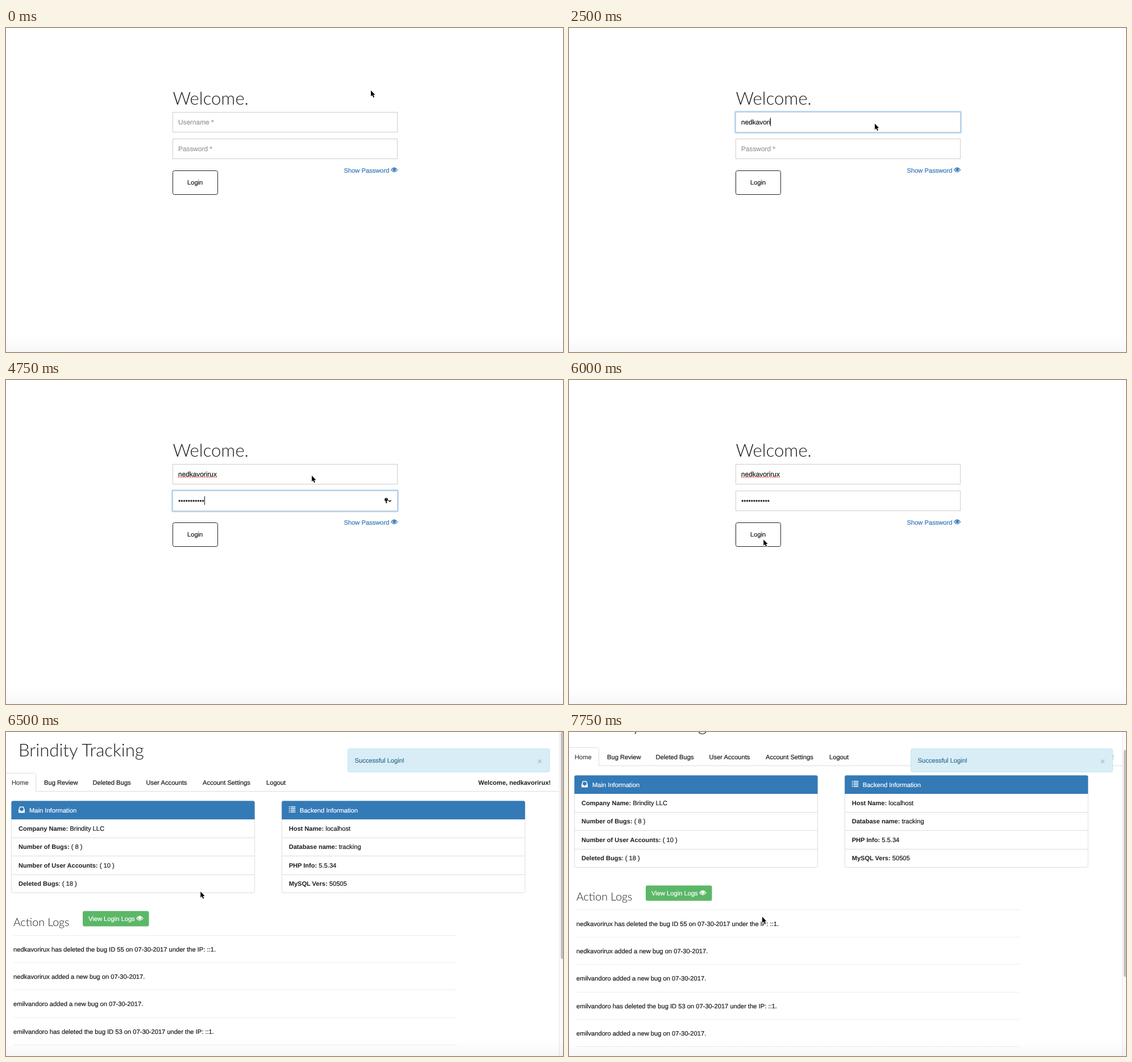
Animation, 980 px wide and 571 px high, one loop 8 s. Source, as an HTML page:

```html
<!DOCTYPE html>
<html lang="en">
<head>
<meta charset="utf-8">
<title>Login demo</title>
<style>
  html, body { margin: 0; width: 100%; height: 100%; overflow: hidden; background: #fff; }
  svg { display: block; width: 980px; height: 571px; }
  text {
    font: 11.17px "Liberation Sans", Arial, sans-serif; color: #1c1c1c;
    fill: currentColor; stroke: currentColor; stroke-width: .22;
    text-rendering: geometricPrecision; white-space: pre;
  }
  .title { font: 300 31.1px Lato, sans-serif; stroke: none; }
  .sub { font: 300 19.6px Lato, sans-serif; stroke: none; }
  .field { font-size: 11.85px; }
  .hint { color: #999; }
  .bold { font-weight: bold; font-size: 11.05px; stroke: none; }
  .white { color: #fff; }
  .link { color: #337ab7; }
  .tab { color: #444; }
  .info { color: #31708f; }
  .box { fill: none; stroke: #ccc; }
  .ring { fill: none; stroke: #b7d9f6; stroke-width: 3; }
  .line { stroke: #ddd; }
  .rule { stroke: #eee; }
</style>
</head>
<body>
<svg viewBox="0 0 980 571" xmlns="http://www.w3.org/2000/svg">
  <defs>
    <linearGradient id="fade" x1="0" y1="0" x2="0" y2="1">
      <stop offset="0" stop-color="#000" stop-opacity="0"/>
      <stop offset="1" stop-color="#000" stop-opacity=".032"/>
    </linearGradient>
    <g id="eye">
      <path d="M.5 5Q6 -2.2 11.5 5Q6 12.2 .5 5Z" fill="none" stroke="currentColor" stroke-width="1.2"/>
      <circle cx="6" cy="4.5" r="2.8" fill="currentColor"/>
      <path d="M4.6 4.2Q4.7 3 5.9 2.8" fill="none" stroke="#fff" stroke-width=".7"/>
    </g>
  </defs>

  <g id="login">
    <text class="title" x="293.5" y="135">Welcome.</text>
    <rect class="ring" id="userRing" x="292.5" y="147.5" width="397" height="37" rx="1.5"/>
    <rect class="ring" id="passRing" x="292.5" y="194.5" width="397" height="37" rx="1.5"/>
    <rect class="box" x="293.5" y="148.5" width="395" height="35"/>
    <rect class="box" x="293.5" y="195.5" width="395" height="35"/>
    <text class="field hint" id="userHint" x="303" y="170">Username *</text>
    <text class="field hint" id="passHint" x="303" y="217">Password *</text>
    <text class="field" id="user" x="303" y="170"></text>
    <path id="spell" fill="none" stroke="#e2382f" stroke-width="1.5" stroke-dasharray="1.7 1.3"/>
    <g id="dots" fill="#222"></g>
    <path id="caret" stroke="#111"/>
    <g id="key">
      <circle cx="669" cy="210.7" r="2.9" fill="#111"/>
      <circle cx="669" cy="209.6" r=".7" fill="#fff"/>
      <path d="M669 212V217.3M669 215.5h1.6" fill="none" stroke="#111" stroke-width="1.5"/>
      <path d="M672.8 211.8l2.4 2.4l2.4 -2.4" fill="none" stroke="#111" stroke-width="1.4"/>
    </g>
    <text class="link" x="594.5" y="255">Show Password</text>
    <use href="#eye" x="677" y="245" color="#337ab7"/>
    <rect x="293.5" y="251.5" width="79" height="42" rx="3" fill="#fff" stroke="#222"/>
    <text x="319" y="276">Login</text>
  </g>

  <g id="dash">
    <g id="page"></g>
    <path d="M973.5 0V571" stroke="#e8e8e8"/>
    <rect x="974" width="6" height="571" fill="#fafafa"/>
    <rect id="thumb" x="976" width="6" height="400" rx="3" fill="#c1c1c1"/>
    <g id="alert">
      <rect x="601.5" y="29.5" width="355" height="41" rx="3" fill="#d9edf7" stroke="#bce8f1"/>
      <text class="info" x="613.5" y="54">Successful Login!</text>
      <path d="M936 48.8l6 6m0 -6l-6 6" stroke="#aebec6" stroke-width="1.5"/>
    </g>
  </g>

  <rect y="543" width="980" height="28" fill="url(#fade)"/>
  <path id="cursor" d="M0 0V10.6L2.4 8.3L4.2 12.5L6 11.7L4.2 7.7H7.4Z" fill="#000"
    stroke="#fff" stroke-width="1.6" paint-order="stroke"/>
</svg>

<script>
const LOOP = 8000, STEP = 250;
const USER = "nedkavorirux", OTHER = "emilvandoro", COMPANY = "Brindity";
const $ = id => document.getElementById(id);

const text = (x, y, s, cls = "", extra = "") => `<text x="${x}" y="${y}" class="${cls}" ${extra}>${s}</text>`;
const hline = (x1, x2, y, cls) => `<path class="${cls}" d="M${x1} ${y}H${x2}"/>`;

function panel(x, title, icon, rows) {
  const firstRow = 154, row = 32.4;
  let s = `<rect x="${x + .5}" y="121.5" width="428" height="162" rx="3" fill="#fff" stroke="#ddd"/>
    <path d="M${x + .5} 154V124.5q0 -3 3 -3h422q3 0 3 3V154Z" fill="#337ab7"/>
    <g transform="translate(${x + 13} 131)">${icon}</g>`;
  s += text(x + 32, 141.5, title, "white");
  rows.forEach(([label, value], i) => {
    const y = firstRow + i * row;
    if (i) s += hline(x + 1, x + 428, Math.floor(y) + .5, "line");
    s += text(x + 13, y + 20, `<tspan class="bold">${label}</tspan>${value}`);
  });
  return s;
}

function buildPage() {
  const inbox = `<path fill-rule="evenodd" fill="#fff"
    d="M2 .5H9L11 6.5V11.5H0V6.5ZM3 2L1.6 6.8H3.5L4.2 8.5H6.8L7.5 6.8H9.4L8 2Z"/>`;
  const list = [1, 4, 7, 10].map(y =>
    `<path d="M0 ${y}h1.8M3 ${y}h8.5" stroke="#fff" stroke-width="1.7"/>`).join("");
  const tabs = [["Bug Review", 67], ["Deleted Bugs", 152.5], ["User Accounts", 246.5],
    ["Account Settings", 346], ["Logout", 458]];
  const added = " added a new bug on 07-30-2017.";
  const deleted = id => ` has deleted the bug ID ${id} on 07-30-2017 under the IP: ::1.`;
  const logs = [USER + deleted(55), USER + added, OTHER + added, OTHER + deleted(53), OTHER + added];

  let s = text(22, 43, COMPANY + " Tracking", "title");
  s += `<path class="line" fill="none" d="M0 72.5H49.5q3 0 3 3V104.5H973"/>`;
  s += text(10, 92.5, "Home", "tab");
  tabs.forEach(([name, x]) => s += text(x, 92.5, name));
  s += text(958.5, 92.5, `Welcome, ${USER}!`, "bold", 'text-anchor="end"');
  s += panel(9, "Main Information", inbox, [
    ["Company Name:", ` ${COMPANY} LLC`], ["Number of Bugs:", " ( 8 )"],
    ["Number of User Accounts:", " ( 10 )"], ["Deleted Bugs", ": ( 18 )"]]);
  s += panel(484.7, "Backend Information", list, [
    ["Host Name:", " localhost"], ["Database name:", " tracking"],
    ["PHP Info:", " 5.5.34"], ["MySQL Vers:", " 50505"]]);
  s += text(13, 342, "Action Logs", "sub");
  s += `<rect x="135" y="315.5" width="116.5" height="27" rx="3" fill="#5bb767"/>`;
  s += text(145, 333, "View Login Logs", "white");
  s += `<use href="#eye" x="229.3" y="323.3" color="#fff"/>`;
  logs.forEach((entry, i) => {
    s += hline(13, 793, Math.round(358 + i * 48.2) + .5, "rule");
    s += text(13, 387 + i * 48.2, entry);
  });
  s += hline(13, 793, 599.5, "rule");
  $("page").innerHTML = s;
}

// Last value whose start time has passed
const at = (keys, t) => keys.reduce((v, k) => t >= k[0] ? k[1] : v, keys[0][1]);

const cursorKeys = [[0, [642, 110]], [250, [592, 138]], [500, [538, 168.5]], [5000, [538, 175]],
  [5250, [430, 236]], [5500, [342.3, 281.3]], [7500, [340, 325.7]]];
const typedKeys = [[0, 0], [1500, 2], [1750, 4], [2000, 5], [2250, 7], [2500, 9],
  [2750, 10], [3000, 11], [3250, 12]];
const dotKeys = [[0, 0], [3750, 1], [4000, 3], [4250, 6], [4500, 8], [4750, 11], [5000, 12]];
const focusKeys = [[0, ""], [1000, "user"], [3500, "pass"], [6000, ""]];
const alertKeys = [[0, 0], [6250, .5], [6500, 1]];
const scrollKeys = [[0, 0], [7750, 45]];

const show = (id, on) => $(id).setAttribute("display", on ? "inline" : "none");

function drawLogin(t) {
  const typed = at(typedKeys, t), dots = at(dotKeys, t), focus = at(focusKeys, t);
  const name = $("user");
  name.textContent = USER.slice(0, typed);
  const end = 303 + (typed ? name.getComputedTextLength() : 0);
  show("userHint", !typed);
  show("passHint", !dots);
  show("userRing", focus === "user");
  show("passRing", focus === "pass");
  show("key", focus === "pass");
  show("caret", focus);
  show("spell", t >= 3500);
  $("spell").setAttribute("d", `M303 171.3H${end}`);
  [...$("dots").children].forEach((dot, i) => dot.setAttribute("display", i < dots ? "inline" : "none"));
  const x = focus === "user" ? Math.round(end) + .5 : Math.round(303 + dots * 4.15) + .5;
  $("caret").setAttribute("d", `M${x} ${focus === "user" ? 158 : 205}v15`);
}

function draw(time) {
  const t = Math.floor(time % LOOP / STEP) * STEP;
  const loggedIn = t >= 6250;
  show("login", !loggedIn);
  show("dash", loggedIn);
  if (loggedIn) {
    const scroll = at(scrollKeys, t);
    $("page").setAttribute("transform", `translate(0 ${-scroll})`);
    $("thumb").setAttribute("y", scroll * .7);
    $("alert").setAttribute("opacity", at(alertKeys, t));
  } else {
    drawLogin(t);
  }
  $("cursor").setAttribute("transform", `translate(${at(cursorKeys, t)})`);
}

buildPage();
$("dots").innerHTML = Array.from({ length: 12 }, (_, i) =>
  `<circle cx="${305.2 + i * 4.15}" cy="213" r="1.65"/>`).join("");

const start = performance.now();
function tick() {
  draw(performance.now() - start);
  requestAnimationFrame(tick);
}
tick();
</script>
</body>
</html>
```
